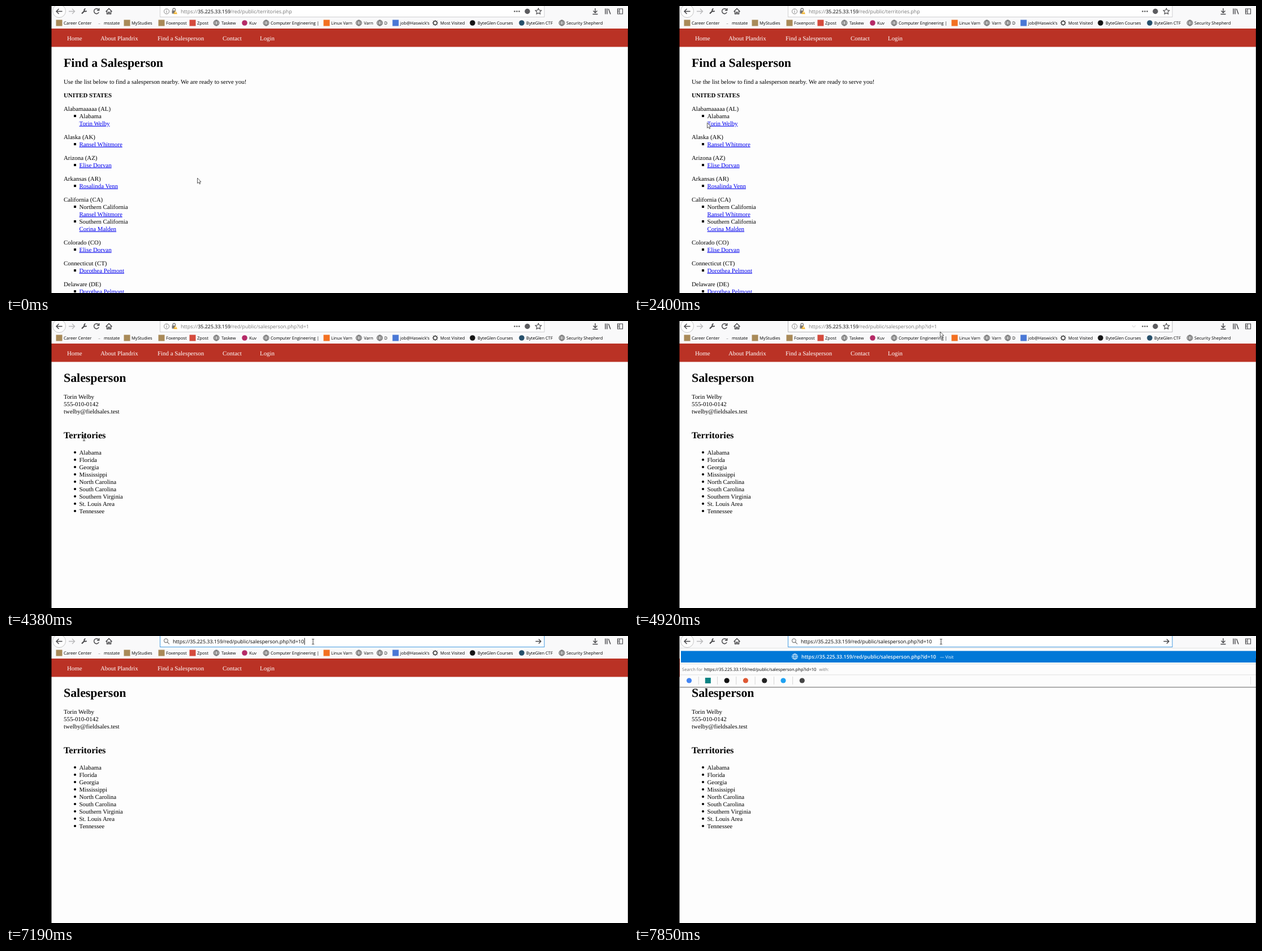
An HTML page for the animation above (8 s loop, 1100x509 px).

```html
<!DOCTYPE html>
<html lang="en">
<head>
<meta charset="utf-8">
<title>Find a Salesperson</title>
<style>
html, body { margin: 0; width: 100%; height: 100%; overflow: hidden; background: #000; }
svg { display: block; width: 1100px; height: 509px; text-rendering: geometricPrecision; }
.page { font: 10.88px "Liberation Serif", serif; }
.ui { font: 7.6px "Open Sans", sans-serif; fill: #000; }
.url { font-size: 8.88px; }
.grey { fill: #777; }
.link { fill: #00e; text-decoration: underline; }
.h1 { font-size: 21.85px; font-weight: bold; }
.h2 { font-size: 16.3px; font-weight: bold; }
.bold { font-weight: bold; }
.icon { fill: none; stroke: #454548; stroke-width: 1.4; }
</style>
</head>
<body>
<svg id="stage" viewBox="0 0 1100 509"></svg>
<script>
const stage = document.getElementById('stage');
const text = (x, y, s, cls = '', more = '') => `<text x="${x}" y="${y}" class="${cls}" ${more}>${s}</text>`;
const rect = (x, y, w, h, fill, more = '') => `<rect x="${x}" y="${y}" width="${w}" height="${h}" fill="${fill}" ${more}/>`;
const dot = (x, y, r, fill) => `<circle cx="${x}" cy="${y}" r="${r}" fill="${fill}"/>`;
const icon = (d, more = '') => `<path class="icon" d="${d}" ${more}/>`;
const group = (id, body, more = '') => `<g id="${id}" ${more}>${body}</g>`;
const globe = (x, y, color = '#333') => icon(
  `M${x - 5} ${y}a5 5 0 1 0 10 0a5 5 0 1 0-10 0h10M${x} ${y - 5}q-5 5 0 10q5-5 0-10M${x - 4} ${y - 2.7}h8M${x - 4} ${y + 2.7}h8`,
  `style="stroke:${color};stroke-width:.75"`);
const gear = (x, y) => dot(x, y, 3.7, '#333') + [0, 45, 90, 135].map(a =>
  rect(x - .6, y - 5, 1.2, 10, '#333', `transform="rotate(${a} ${x} ${y})"`)).join('') + dot(x, y, 2.5, '#f9f9fa');
const square = color => x => rect(x - 5.5, 24.5, 11, 11, color);
const circle = color => x => dot(x, 30, 4.8, color);
const globeAt = x => globe(x, 30);

// Browser chrome
const bookmarks = [
  [94, 102, 'Career Center', square('#a98a58')],
  [165, 173, 'msstate', x => rect(x - 1.5, 31, 3, 1, '#b5b5b5')],
  [214, 222, 'MyStudies', square('#a98a58')],
  [275, 283, 'Foxenpost', square('#a98a58')],
  [330, 338, 'Zpost', square('#d54b3d')],
  [372, 381, 'Taskew', globeAt],
  [422, 430, 'Kuv', circle('#b52a67')],
  [460, 468, 'Computer Engineering |', globeAt],
  [567, 575, 'Linux Varn', square('#f37021')],
  [624, 633, 'Varn', globeAt],
  [661, 669, 'D', globeAt],
  [689, 697, 'job@Haswick\'s', square('#4a78d6')],
  [759, 768, 'Most Visited', x => gear(x, 30)],
  [825, 834, 'ByteGlen Courses', circle('#151515')],
  [912, 920, 'ByteGlen CTF', circle('#27506b')],
  [983, 991, 'Security Shepherd', globeAt]
];

const toolbar =
  rect(80, 0, 1020, 40, '#f9f9fa') +
  `<circle cx="94" cy="9" r="11.5" fill="#fdfdfd" stroke="#b8b8b8" stroke-width=".8"/>` +
  icon('M99.5 9.5H89M93.5 5L89 9.5L93.5 14') +
  icon('M111 9.5h10M117 5l4.5 4.5L117 14', 'style="stroke:#b9b9bb"') +
  icon('M134 13.5l5-5', 'style="stroke-width:2.2"') +
  icon('M140.5 5a2.3 2.3 0 1 0 2 3.6', 'style="stroke-width:1.9"') +
  group('reload', icon('M163.7 6.5A4.5 4.5 0 1 0 164.2 11M164.7 4v3.8h-3.8')) +
  group('stop', icon('M155.5 5l9.5 9M165 5l-9.5 9', 'style="stroke:#aaa"')) +
  icon('M176.5 10L182 4.5L187.5 10M178.5 9v5h2.5v-3h2v3h2.5V9') +
  rect(272.5, -2, 679.5, 21.5, '#fff', 'id="field" stroke-width="1"') +
  icon('M1042 4v8M1038.5 8.5l3.5 3.5l3.5-3.5M1037.5 14.5h9') +
  icon('M1060 4.5v10M1063 4.5v10M1065.5 5l3.5 9.5') +
  icon('M1081.5 5h9v9h-9zM1085 5v9M1082 8h2M1082 10.5h2', 'style="stroke-width:1.1"') +
  group('bookmarks', bookmarks.map(([ix, tx, label, draw]) => draw(ix) + text(tx, 33.2, label)).join(''));

const host = '35.225.33.159';
const idleUrl = path => `<tspan class="grey">https://</tspan>${host}<tspan class="grey">${path}</tspan>`;
const personPath = '/red/public/salesperson.php?id=1';
const fullUrl = `https://${host}${personPath}`;

const address =
  group('identity',
    icon('M279.5 9.5a4.5 4.5 0 1 0 9 0a4.5 4.5 0 1 0-9 0M284 8.5v3.5M284 6.5v1', 'style="stroke:#737373;stroke-width:.9"') +
    icon('M295 8V6.5a2.2 2.2 0 0 1 4.4 0V8', 'style="stroke:#777"') + rect(293.5, 8, 6.5, 5.5, '#777') +
    `<path d="M299.5 8l3.5 6.3h-7z" fill="#f2b32c"/>` + rect(299, 10, 1, 2.3, '#fff')) +
  group('actions',
    [899.5, 903.5, 907.5].map(x => dot(x, 9.5, 1.3, '#555')).join('') + dot(922, 9.5, 4.7, '#5c5c5f') +
    icon('M941.5 4.2l1.6 3.4l3.7.4l-2.7 2.5l.7 3.7l-3.3-1.8l-3.3 1.8l.7-3.7l-2.7-2.5l3.7-.4z', 'style="stroke-width:1.1"')) +
  group('chevron', icon('M881 8l3 3l3-3', 'style="stroke:#666;stroke-width:1.2"')) +
  group('listUrl', text(309, 13, idleUrl('/red/public/territories.php'), 'url')) +
  group('personUrl', text(309, 13, idleUrl(personPath), 'url')) +
  group('selection', rect(309, 3, 227.5, 13, '#0078d7') + text(309, 13, fullUrl, 'url', 'style="fill:#fff"')) +
  group('plainUrl', text(309, 13, fullUrl, 'url')) +
  group('typed',
    icon('M279.5 8.3a3.4 3.4 0 1 0 6.8 0a3.4 3.4 0 1 0-6.8 0M285.3 10.8l3.6 3.6', 'style="stroke:#858585;stroke-width:1.3"') +
    text(295, 13, fullUrl + '0', 'url') + icon('M936.5 9.5h9.5M942 5.5l4 4l-4 4')) +
  rect(0, 3.5, 1, 12, '#111', 'id="caret"');

// Web pages
const serif = (x, middle, s, cls) => text(x, middle + 3.6, s, cls);
const nav = rect(80, 40, 1020, 32.5, '#ba3225') +
  `<g fill="#fff">${[[108, 'Home'], [167, 'About Plandrix'], [268, 'Find a Salesperson'], [383, 'Contact'], [449, 'Login']]
    .map(([x, s]) => serif(x, 57.5, s)).join('')}</g>`;

// Each entry: state, then [optional territory, salesperson] pairs
const states = [
  ['Alabamaaaaa (AL)', ['Alabama', 'Torin Welby']],
  ['Alaska (AK)', ['', 'Ransel Whitmore']],
  ['Arizona (AZ)', ['', 'Elise Dorvan']],
  ['Arkansas (AR)', ['', 'Rosalinda Venn']],
  ['California (CA)', ['Northern California', 'Ransel Whitmore'], ['Southern California', 'Corina Malden']],
  ['Colorado (CO)', ['', 'Elise Dorvan']],
  ['Connecticut (CT)', ['', 'Dorothea Pelmont']],
  ['Delaware (DE)', ['', 'Dorothea Pelmont']]
];

function stateList() {
  let y = 182, out = '';
  for (const [state, ...areas] of states) {
    out += serif(102, y, state);
    for (const [area, person] of areas) {
      y += 13;
      out += rect(120, y - 2, 4, 4, '#000');
      if (area) { out += serif(129.5, y, area); y += 13; }
      out += serif(129.5, y, person, 'link');
    }
    y += 24;
  }
  return out;
}

const listPage = text(102, 108, 'Find a Salesperson', 'h1') +
  serif(102, 134, 'Use the list below to find a salesperson nearby. We are ready to serve you!') +
  serif(102, 158, 'UNITED STATES', 'bold') + stateList();

const territories = ['Alabama', 'Florida', 'Georgia', 'Mississippi', 'North Carolina',
  'South Carolina', 'Southern Virginia', 'St. Louis Area', 'Tennessee'];
const personPage = text(102, 108, 'Salesperson', 'h1') +
  ['Torin Welby', '555-010-0142', 'twelby@fieldsales.test'].map((s, i) => serif(102, 134 + 13 * i, s)).join('') +
  text(102, 208, 'Territories', 'h2') +
  territories.map((s, i) => dot(122, 233 + 13 * i, 2.1, '#000') + serif(129.5, 233 + 13 * i, s)).join('');

// Address suggestions
const engines = ['#4285f4', '#0c8484', '#111', '#de5833', '#222', '#1da1f2', '#444'];
const popup = rect(81, 21, 1019, 0, '#fcfcfc', 'id="panel"') + rect(81, 21, 1019, 1, '#e4e4e4') +
  rect(83, 26.5, 1017, 20.5, '#0078d7') + globe(284.5, 36.5, '#fff') +
  text(296, 40, fullUrl + '0', 'url', 'style="fill:#fff;font-weight:600"') +
  text(541, 40, '— Visit', '', 'style="fill:#fff"') +
  group('engines',
    rect(81, 49, 1019, 1, '#dedede') +
    text(85, 62.3, 'Search for', 'grey') + text(124, 62.3, fullUrl + '0') + text(327.5, 62.3, 'with:', 'grey') +
    rect(81, 68.5, 1019, .8, '#dadada') +
    engines.map((color, i) => {
      const x = 97.5 + 33.3 * i;
      return (i === 1 ? rect(x - 5, 74, 10, 10, color) : dot(x, 79, 4.6, color)) +
        (i < 6 ? rect(x + 16.3, 72, .8, 14, '#ccc') : '');
    }).join('') +
    rect(1090, 72, .8, 14, '#ddd') + rect(81, 90, 1019, 1.6, '#999'));

const pointers = group('arrow', `<path d="M0 0V9.5L2.2 7.4L3.7 10.8L5.2 10.2L3.7 7H6.5Z" fill="#fff" stroke="#333" stroke-width=".8"/>`) +
  group('beam', icon('M-2-4.5h1.5L0-4L.5-4.5H2M0-4V4M-2 4.5h1.5L0 4L.5 4.5H2', 'style="stroke:#222;stroke-width:.9"')) +
  group('hand', `<path d="M-1-4.5q1-1 1.8 0V0l4 1v3.5L3.5 8H-1L-4 3.5q0-1.5 1.5-.7L-1 4Z" fill="#fff" stroke="#222" stroke-width=".8"/>`);

stage.innerHTML = rect(80, 0, 1020, 509, '#fdfdfd') +
  `<g class="page">${nav}${group('listPage', listPage)}${group('personPage', personPage)}</g>` +
  `<g class="ui">${toolbar}${address}${group('popup', popup)}</g>` +
  rect(80, 0, 1, 509, '#0007') + rect(1099, 40, 1, 469, '#0004') + group('pointer', pointers);

const el = Object.fromEntries([...stage.querySelectorAll('[id]')].map(node => [node.id, node]));
const show = (id, on) => { el[id].style.display = on ? '' : 'none'; };
const ramp = (t, a, b) => Math.min(1, Math.max(0, (t - a) / (b - a)));

// Pointer path: time, x, y
const path = [
  [0, 338.5, 305], [249, 338.5, 305], [250, 346, 283], [470, 346, 283], [1550, 420, 9],
  [2270, 112, 222], [2390, 129.5, 207], [2630, 138, 208], [4310, 138, 208], [4910, 541.5, 19], [5270, 543, 10]
];

function pointerAt(t) {
  const held = t < 590 ? t : Math.floor((t + 10) / 120) * 120 - 10;
  const i = path.findIndex(key => key[0] > held);
  if (i < 0) return path.at(-1).slice(1);
  const [t0, x0, y0] = path[i - 1], [t1, x1, y1] = path[i];
  const k = ramp(held, t0, t1);
  return [x0 + (x1 - x0) * k, y0 + (y1 - y0) * k];
}

function draw(t) {
  const between = (a, b) => t >= a && t < b;
  const onPerson = t >= 3210, focused = t >= 5460, typing = t >= 7070, loading = between(3070, 3640);

  show('listPage', !onPerson);
  show('personPage', onPerson);
  show('reload', !loading);
  show('stop', loading);

  show('listUrl', !onPerson);
  show('personUrl', onPerson && t < 5600);
  show('selection', between(5600, 6260));
  show('plainUrl', between(6260, 7070));
  show('typed', typing);
  show('identity', !typing);
  show('actions', !typing);
  show('caret', between(6260, 6540) || between(7070, 7580));
  el.caret.setAttribute('x', typing ? 527.5 : 536);

  const hover = ramp(t, 1310, 1430) - ramp(t, 1790, 1910) + ramp(t, 4840, 5200);
  show('chevron', !typing);
  el.chevron.style.opacity = hover;
  el.field.setAttribute('stroke', focused ? '#459be0' : hover > 0 ? '#b8b8ba' : '#cfcfd1');

  // The panel keeps its earlier height until the list has settled.
  const drop = t < 7850 ? 184 : 0;
  show('popup', t >= 7330);
  el.panel.setAttribute('height', 70 + drop);
  el.engines.setAttribute('transform', `translate(0 ${drop})`);

  const [x, y] = pointerAt(t);
  const shape = between(2520, 3340) ? 'hand' : y < 18 || between(3340, 4430) ? 'beam' : 'arrow';
  for (const id of ['arrow', 'beam', 'hand']) show(id, id === shape);
  el.pointer.setAttribute('transform', `translate(${x} ${y})`);
}

const start = performance.now();
function tick() {
  draw((performance.now() - start) % 8000);
  requestAnimationFrame(tick);
}
tick();
</script>
</body>
</html>
```
